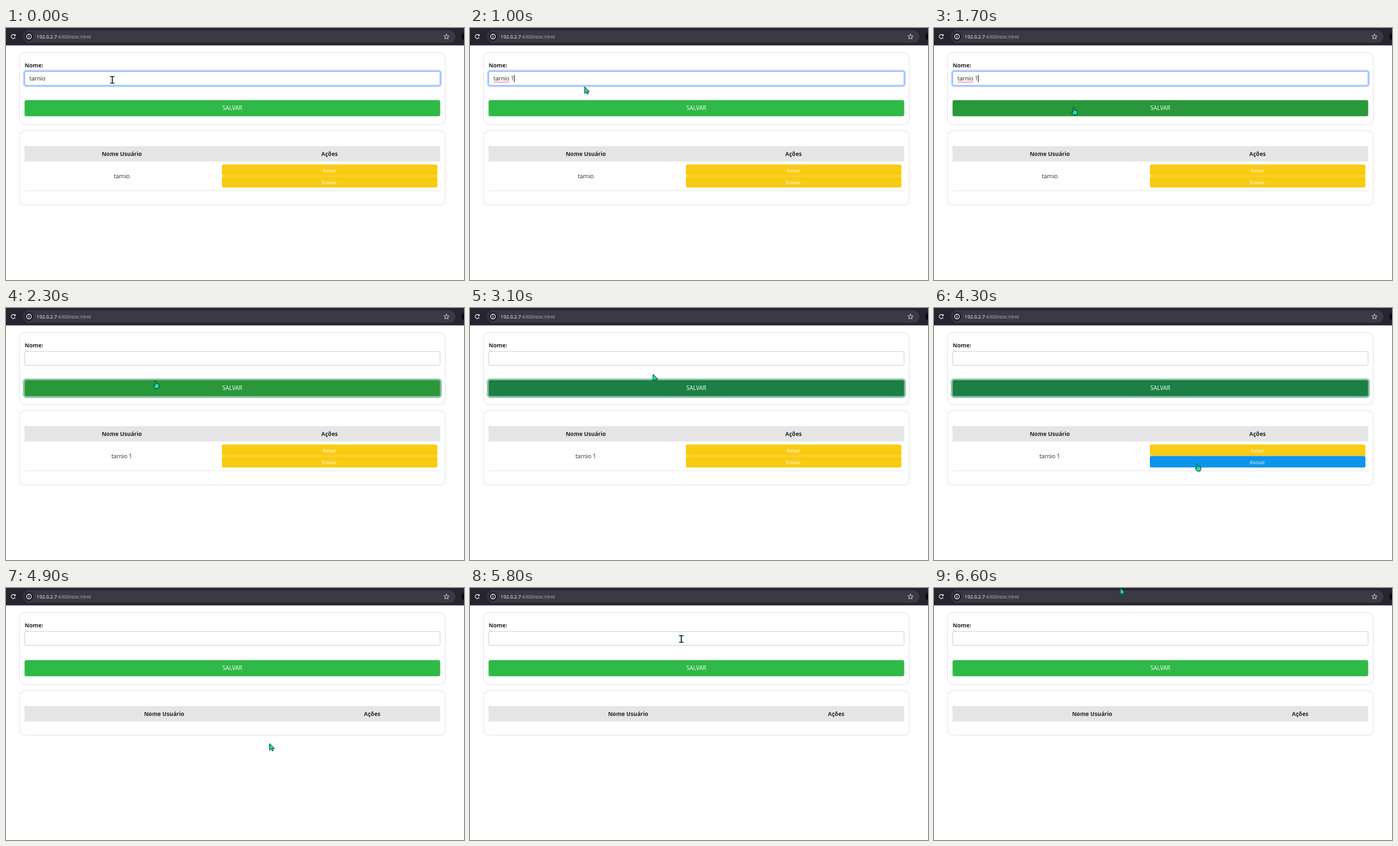
An HTML page for the animation above (6.9 s loop, 698x384 px).

```html
<!DOCTYPE html>
<html lang="pt">
<head>
<meta charset="utf-8">
<title>Cadastro</title>
<style>
  html, body { margin: 0; width: 100%; height: 100%; overflow: hidden; background: #fff; }
  svg { display: block; width: 698px; height: 384px; }
  text { font: 8.7px "Open Sans", "Noto Sans", sans-serif; fill: #212529; }
  .bold { font-weight: 700; font-size: 8.55px; }
  .mid { text-anchor: middle; }
  .light { fill: #fff; }
  .small { font-size: 7.4px; }
  .card { fill: #fff; stroke: #ececec; stroke-width: 1.4; }
  .icon { fill: none; stroke: #e3e3e8; stroke-width: 1.1; }
  #cursor path { fill: #18e5b0; stroke: #102b28; stroke-width: .9; stroke-linejoin: round; }
</style>
</head>
<body>
<svg viewBox="0 0 698 384">
  <rect width="698" height="26.5" fill="#24252f"/>
  <rect x="26" y="3.5" width="659" height="19" rx="9.5" fill="#393a44"/>
  <circle cx="35" cy="13" r="7" fill="#24252f"/>
  <g class="icon">
    <path d="M13.6 11.2A3.1 3.1 0 1 0 14 14M14.2 9.4V11.7H11.9"/>
    <circle cx="35" cy="13" r="3.6"/>
    <path d="M35 12.6V15M35 10.8V11.7"/>
    <path stroke-width=".8" d="M671.3 9.2L672.4 11.9L675.3 12.1L673.1 14L673.8 16.8L671.3 15.3L668.8 16.8L669.5 14L667.3 12.1L670.2 11.9Z"/>
  </g>
  <circle cx="700" cy="13" r="6" fill="#08080a"/>
  <text class="small light" x="46.5" y="15.8">192.0.2.7<tspan fill="#b4b5bd">:4300/doc.html</tspan></text>

  <rect class="card" x="20.5" y="37.5" width="649" height="109.5" rx="8"/>
  <text class="bold" x="28.5" y="59.8">Nome:</text>
  <rect id="inputRing" x="27.2" y="64.9" width="635.6" height="23.9" rx="3.5" fill="none" stroke="#b9d2fb" stroke-width="2.4"/>
  <rect id="input" x="28.5" y="66.3" width="633" height="21" rx="2.5" fill="#fff"/>
  <text id="typed" x="35.7" y="80.2"></text>
  <path id="squiggle" fill="none" stroke="#e0383e" stroke-width=".8"/>
  <path id="caret" d="M67.5 71.5V82.5" stroke="#222" stroke-width=".9"/>
  <rect id="saveRing" x="27" y="108.7" width="636" height="27" rx="3.5" fill="none" stroke="#8cc3a9" stroke-width="2.4"/>
  <rect id="save" x="28.3" y="110" width="633.4" height="24.5" rx="2.5"/>
  <text class="mid light" x="345" y="125.4">SALVAR</text>

  <rect id="list" class="card" x="20.5" y="156.3" width="649" rx="8"/>
  <rect x="28.3" y="180" width="633.4" height="23.5" fill="#e5e5e6"/>
  <text id="headName" class="bold mid" y="194.9">Nome Usuário</text>
  <text id="headActions" class="bold mid" y="194.9">Ações</text>
  <g id="row">
    <path d="M28.3 248H661.7" stroke="#dee2e6"/>
    <text id="user" class="mid" x="176.5" y="229"></text>
    <rect id="edit" x="329" y="208" width="328.5" height="17.5" rx="2.5"/>
    <rect id="remove" x="329" y="225.5" width="328.5" height="17.5" rx="2.5"/>
    <text class="mid small light" x="493" y="219.8">Editar</text>
    <text class="mid small light" x="493" y="237.5">Excluir</text>
  </g>

  <g id="cursor">
    <path id="arrow" d="M0 0V10.2L2.5 8.1L4.1 11.3L5.7 10.5L4.2 7.5H7.3Z"/>
    <path id="hand" d="M-1 1Q0 -.6 1 1V4L4.8 5Q6 5.7 5.6 8L4.4 11.6H-.4L-3 7.8Q-3.2 6 -1 7Z"/>
    <g id="beam">
      <path style="fill:none;stroke:#12483c;stroke-width:1.7" d="M-3.3 -5H3.3M0 -5V5M-3.3 5H3.3"/>
    </g>
  </g>
</svg>
<script>
const LOOP = 6900, STEP = 100;
const CLICK_SAVE = 1800, PRESS_REMOVE = 4600, REMOVED = 4800;
const NAME = 'tarnio';

// time, x, y of the pointer's hot spot
const path = [
  [0, 162, 79], [900, 162, 79], [1300, 213, 121], [2100, 213, 121],
  [2300, 228, 111], [2700, 246, 78], [2800, 246, 78], [3100, 279, 101],
  [3500, 365, 200], [3900, 401, 237], [5300, 402, 237], [6000, 290, 14],
  [6400, 284, 3], [6500, 284, 3], [6600, 284, 0], [LOOP, 284, 0]
];

const el = id => document.getElementById(id);
const set = (id, name, value) => el(id).setAttribute(name, value);
const show = (id, on) => { el(id).style.display = on ? '' : 'none'; };

set('squiggle', 'd', 'M36 82.6q.8 -1.7 1.6 0' + 't1.6 0'.repeat(14));

function pointerAt(t) {
  const i = path.findIndex(p => p[0] > t);
  const [t0, x0, y0] = path[i - 1], [t1, x1, y1] = path[i];
  const k = (t - t0) / (t1 - t0);
  return [x0 + (x1 - x0) * k, y0 + (y1 - y0) * k];
}

function draw(t) {
  const [x, y] = pointerAt(t);
  const within = (top, bottom) => y >= top && y < bottom;
  const saved = t >= CLICK_SAVE, hasRow = t < REMOVED;
  const saveFocus = saved && t < PRESS_REMOVE;
  const overSave = within(110, 134.5);
  const overEdit = hasRow && x > 329 && within(208, 225.5);
  const overRemove = hasRow && x > 329 && within(225.5, 243);

  el('typed').textContent = saved ? '' : t < 500 ? NAME : NAME + ' 1';
  show('squiggle', t >= 200 && !saved);
  show('caret', t >= 500 && !saved);
  show('inputRing', !saved);
  set('input', 'stroke', saved ? '#ced4da' : '#86b0f2');

  show('saveRing', saveFocus);
  set('save', 'fill', overSave ? '#29973a' : saveFocus ? '#1c7f46' : '#2fb946');

  show('row', hasRow);
  el('user').textContent = saved ? NAME + ' 1' : NAME;
  set('edit', 'fill', overEdit ? '#0d94ec' : '#f9cb13');
  set('remove', 'fill', overRemove ? '#0d94ec' : '#f9cb13');
  set('list', 'height', hasRow ? 113.5 : 68);
  set('headName', 'x', hasRow ? 176.5 : 241);
  set('headActions', 'x', hasRow ? 493 : 558);

  const hand = overSave || overEdit || overRemove;
  const beam = within(66, 88) || within(4, 22);
  show('hand', hand);
  show('beam', beam);
  show('arrow', !hand && !beam);
  show('cursor', t < 200 || t >= 700); // hidden while typing
  set('cursor', 'transform', `translate(${x} ${y})`);
}

function tick() {
  const t = performance.now() % LOOP;
  draw(Math.floor(t / STEP) * STEP);
  requestAnimationFrame(tick);
}
tick();
</script>
</body>
</html>
```
